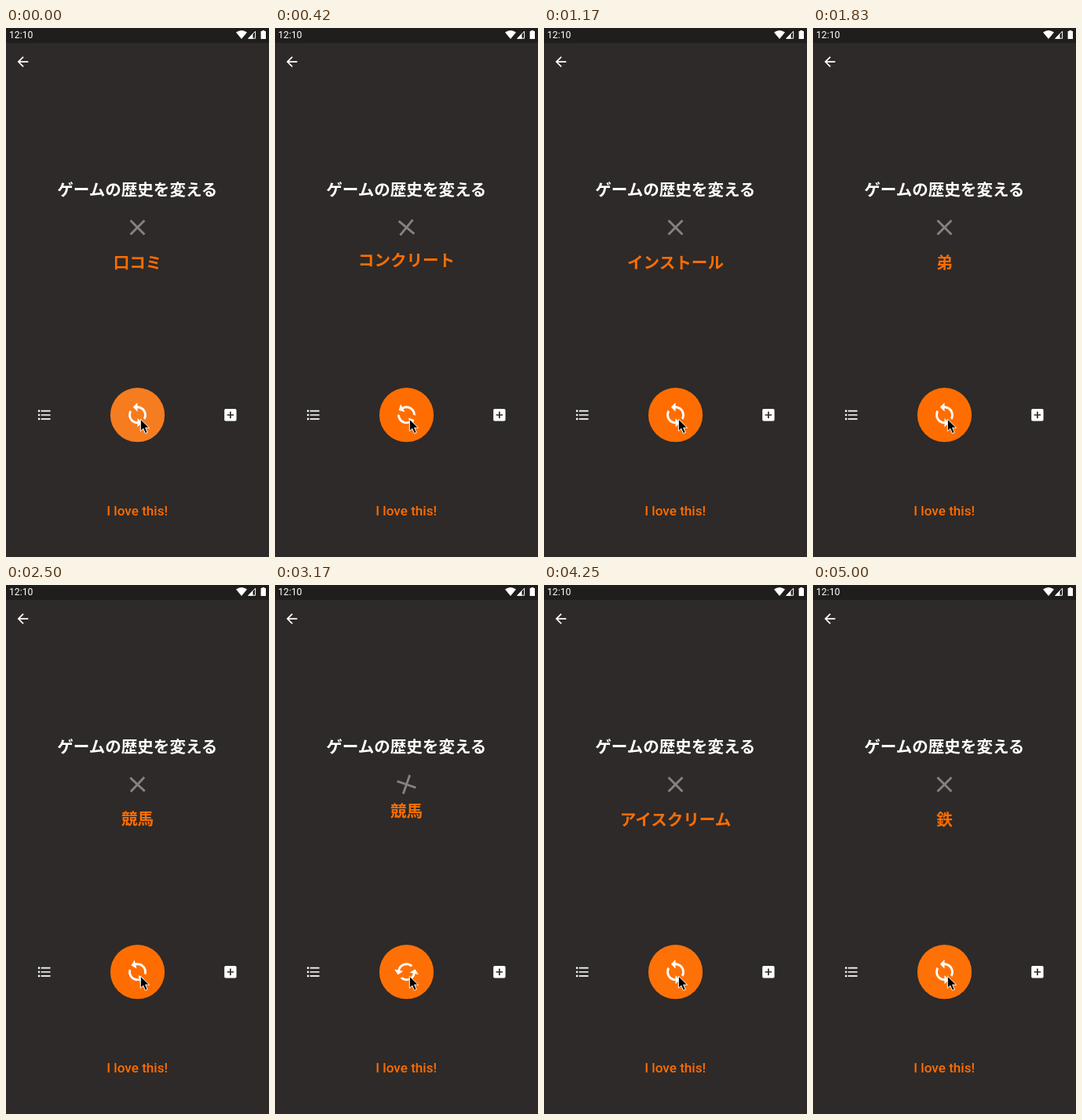
An HTML page for the animation above (5080 ms loop, 335 by 675 pixels).

```html
<!DOCTYPE html>
<html lang="ja">
<head>
<meta charset="utf-8">
<title>Idea shuffle</title>
<style>
  html, body { margin: 0; width: 100%; height: 100%; overflow: hidden; background: #2d2a29; }
  svg { display: block; width: 335px; height: 675px; }
  text { font-family: Roboto, sans-serif; }
  .ja { font: 700 20.55px "Noto Sans CJK JP", "Noto Sans CJK", sans-serif; text-anchor: middle; }
  .accent { fill: #ff6d00; }
  .love { font-size: 17.1px; font-weight: 500; text-anchor: middle; }
</style>
</head>
<body>
<svg viewBox="0 0 335 675" fill="#fff">
  <rect width="335" height="675" fill="#2d2a29"/>

  <!-- status bar -->
  <rect width="335" height="19" fill="#201e1d"/>
  <text x="4" y="13.2" font-size="12.2">12:10</text>
  <path d="M300 14L293 5.6Q300 .4 307 5.6Z"/>
  <path d="M308.8 13.2L317.6 4.2V13.2Z" fill="none" stroke="#fff"/>
  <path d="M308 13.7L314.5 7V13.7Z"/>
  <path d="M326.3 3H329.3V4.1H331V14H324.6V4.1H326.3Z"/>

  <!-- app bar -->
  <path transform="translate(11.2 32.8) scale(.8545)" d="M20 11H7.83l5.59-5.59L12 4l-8 8 8 8 1.41-1.41L7.83 13H20z"/>

  <!-- idea -->
  <text class="ja" x="167.3" y="214.3">ゲームの歴史を変える</text>
  <g transform="translate(167.5 254.5) scale(1.424)">
    <path id="cross" fill="#858382" d="M7 -5.59L5.59 -7 0 -1.41 -5.59 -7 -7 -5.59 -1.41 0 -7 5.59 -5.59 7 0 1.41 5.59 7 7 5.59 1.41 0z"/>
  </g>
  <text id="word" class="ja accent" x="167.5" y="306.5"></text>

  <!-- controls -->
  <g transform="translate(38.6 483.5) scale(.8545)">
    <circle cx="4" cy="6" r="1.5"/><circle cx="4" cy="12" r="1.5"/><circle cx="4" cy="18" r="1.5"/>
    <path d="M7 5h14v2H7zM7 11h14v2H7zM7 17h14v2H7z"/>
  </g>
  <path transform="translate(275.6 483.5) scale(.8545)" d="M19 3H5c-1.1 0-2 .9-2 2v14c0 1.1.9 2 2 2h14c1.1 0 2-.9 2-2V5c0-1.1-.9-2-2-2zm-2 10h-4v4h-2v-4H7v-2h4V7h2v4h4z"/>
  <circle class="accent" cx="167.5" cy="493.7" r="34.6"/>
  <circle id="ripple" cx="167.5" cy="493.7" r="34.6" fill="#c8c8c8"/>
  <g transform="translate(167.5 493.7) scale(1.424)">
    <g id="sync">
      <path transform="translate(-12 -12)" d="M12 4V1L8 5l4 4V6c3.31 0 6 2.69 6 6 0 1.01-.25 1.97-.7 2.8l1.46 1.46C19.54 15.03 20 13.57 20 12c0-4.42-3.58-8-8-8zm0 14c-3.31 0-6-2.69-6-6 0-1.01.25-1.97.7-2.8L5.24 7.74C4.46 8.97 4 10.43 4 12c0 4.42 3.58 8 8 8v3l4-4-4-4z"/>
    </g>
  </g>
  <path d="M171.3 499v15.4l3.5-3.3 2.6 6.2 2.8-1.2-2.6-6h4.9z" fill="#000" stroke="#fff" stroke-width="1"/>
  <text class="love accent" x="167.2" y="621.8">I love this!</text>
</svg>
<script>
  const LOOP = 5080, SPIN = 500, PRESS = 120, FADE = 200;
  // word, release time, how long the button is held before it
  const taps = [
    ['コンクリート', 120, 220],
    ['インストール', 640, 150],
    ['弟', 1280, 100],
    ['競馬', 2140, 60],
    ['競馬', 3000, 200],
    ['アイスクリーム', 3700, 200],
    ['鉄', 4470, 240]
  ];
  const [cross, word, ripple, sync] =
    ['cross', 'word', 'ripple', 'sync'].map(id => document.getElementById(id));
  const clamp = v => Math.min(1, Math.max(0, v));

  function glow(t, [, at, hold]) {
    const since = (t - at + hold + LOOP) % LOOP;
    return clamp(since / PRESS) * clamp(1 - (since - hold) / FADE);
  }

  function draw(now) {
    const t = now % LOOP;
    const [label, at] = taps.filter(tap => tap[1] <= t).pop() || ['口コミ', -SPIN];
    const p = clamp((t - at) / SPIN), left = 1 - p;

    if (word.textContent !== label) word.textContent = label;
    word.setAttribute('transform', `translate(0 ${-36 * left ** 3})`);
    word.setAttribute('opacity', clamp(p * 5));
    cross.setAttribute('transform', `rotate(${-90 * left ** 3})`);
    sync.setAttribute('transform', `rotate(${-180 * left ** 2})`);
    ripple.setAttribute('opacity', 0.19 * Math.max(...taps.map(tap => glow(t, tap))));
  }

  const start = performance.now();
  function tick() {
    draw(performance.now() - start);
    requestAnimationFrame(tick);
  }
  tick();
</script>
</body>
</html>
```
